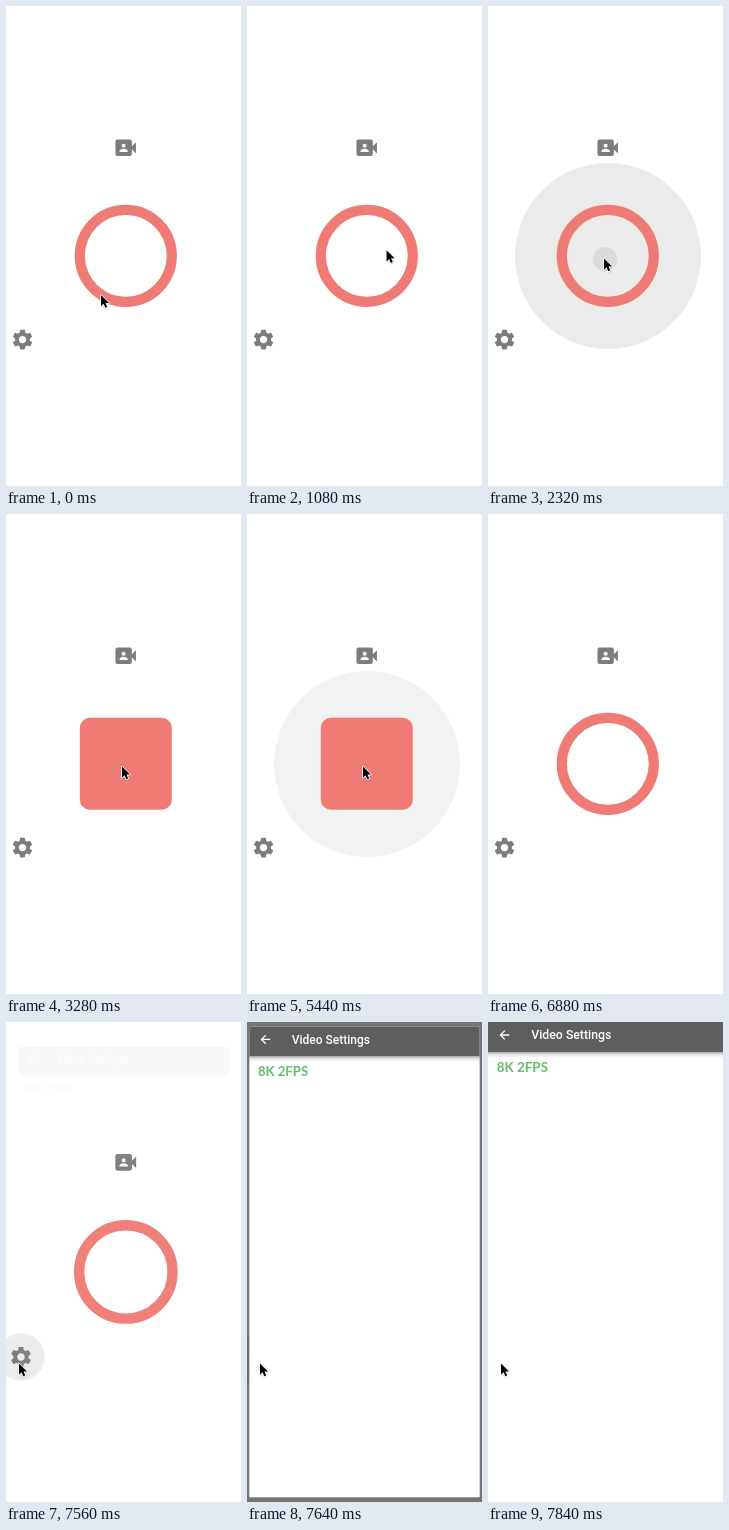
Write an HTML page that moves like this. It is 235x480 px and loops after 8000 ms.

```html
<!DOCTYPE html>
<html lang="en">
<head>
<meta charset="utf-8">
<title>Recorder</title>
<style>
  html, body { margin: 0; width: 100%; height: 100%; overflow: hidden; background: #fff; }
  svg { display: block; width: 100%; height: 100%; }
  .ink { fill: #bcbcbc; }
  .splash { fill: #c0c0c0; }
  .icon { fill: #7c7c7c; }
  .title { font: 500 12.25px Roboto, sans-serif; fill: #fff; }
  .mode { font: 700 13.4px Lato, sans-serif; fill: #66bb6a; }
</style>
</head>
<body>
<svg viewBox="0 0 235 480">
  <defs>
    <linearGradient id="fall" x2="0" y2="1">
      <stop offset="0" stop-opacity=".34"/>
      <stop offset=".45" stop-opacity=".1"/>
      <stop offset="1" stop-opacity="0"/>
    </linearGradient>
    <filter id="soft" x="-50%" y="-50%" width="200%" height="200%">
      <feGaussianBlur stdDeviation="1"/>
    </filter>
    <path id="arrow" d="M0 0V11.2L2.6 8.8 4.3 12.7 6.2 11.9 4.5 8.1H8Z"/>
  </defs>

  <g id="home">
    <rect x="-10" y="-10" width="255" height="500" fill="#fff"/>
    <circle id="recInk" class="ink" cx="120" cy="250" r="93"/>
    <circle id="recSplash" class="splash"/>
    <circle id="gearInk" class="ink" cx="16.5" cy="333.5" r="23.6"/>
    <circle id="gearSplash" class="splash" cx="16" cy="334"/>
    <path class="icon" fill-rule="evenodd" transform="translate(107.4 129.5) scale(1.025)"
      d="M18 10.48V6a2 2 0 0 0-2-2H4a2 2 0 0 0-2 2v12a2 2 0 0 0 2 2h12a2 2 0 0 0 2-2v-4.48l4 3.98v-11ZM10 8a2 2 0 0 1 0 4 2 2 0 0 1 0-4ZM14 16H6v-.57c0-.81.48-1.53 1.22-1.85a7 7 0 0 1 5.56 0c.74.32 1.22 1.04 1.22 1.85Z"/>
    <g id="gear" class="icon" transform="translate(16.5 333.6) scale(1.03)">
      <circle r="5.4" fill="none" stroke="#7c7c7c" stroke-width="3.6"/>
    </g>
    <circle id="ring" cx="119.8" cy="249.8" r="46" fill="none" stroke="#f07b75" stroke-width="10.2"/>
    <rect id="stop" x="73.8" y="203.8" width="92" height="92" rx="10" fill="#f07b75"/>
  </g>

  <rect id="scrim" width="235" height="480"/>

  <g id="settings">
    <rect width="235" height="480" fill="#fff"/>
    <rect y="30" width="235" height="6" fill="url(#fall)"/>
    <rect width="235" height="30" fill="#5e5e5e"/>
    <path d="M21.3 13H12.6M16.8 8.6 12.4 13l4.4 4.4" fill="none" stroke="#fff" stroke-width="1.3"/>
    <text class="title" x="43.3" y="17.4">Video Settings</text>
    <text class="mode" x="8.8" y="50">8K 2FPS</text>
  </g>

  <g id="cursor">
    <use href="#arrow" x=".4" y="1" opacity=".4" filter="url(#soft)"/>
    <use href="#arrow" stroke="#fff" stroke-width="1.6" stroke-linejoin="round"/>
    <use href="#arrow"/>
  </g>
</svg>
<script>
const LOOP = 8000;
const $ = id => document.getElementById(id);
const set = (id, attrs) => {
  for (const k in attrs) $(id).setAttribute(k, attrs[k]);
};
const show = (id, on) => { $(id).style.display = on ? '' : 'none'; };
const lerp = (a, b, p) => a + (b - a) * p;
const span = (t, a, b) => Math.min(1, Math.max(0, (t - a) / (b - a)));
const smooth = p => p * p * (3 - 2 * p);

const bez = (a, b, c, d, u) => {
  const v = 1 - u;
  return v * v * v * a + 3 * v * v * u * b + 3 * v * u * u * c + u * u * u * d;
};

function ease(x1, y1, x2, y2, x) {
  let lo = 0, hi = 1;
  for (let i = 0; i < 24; i++) {
    const mid = (lo + hi) / 2;
    if (bez(0, x1, x2, 1, mid) < x) lo = mid; else hi = mid;
  }
  return bez(0, y1, y2, 1, (lo + hi) / 2);
}

// Linear interpolation through [time, value] pairs
function track(t, keys) {
  let v = keys[0][1];
  for (let i = 1; i < keys.length; i++) {
    if (t >= keys[i - 1][0]) v = lerp(keys[i - 1][1], keys[i][1], span(t, keys[i - 1][0], keys[i][0]));
  }
  return v;
}

// Page zoom: short acceleration, long settle
const zoomCurve = p => p < 1 / 6
  ? 0.4 * ease(0.05, 0, 0.1333, 0.06, p * 6)
  : lerp(0.4, 1, ease(0.2083, 0.82, 0.25, 1, (p - 1 / 6) * 1.2));

const zoom = s => `translate(117.5 240) scale(${s}) translate(-117.5 -240)`;

// Each move: start, end, then the four points of a curve
const straight = (t0, t1, x0, y0, x1, y1) => [t0, t1, [x0, x0, x1, x1], [y0, y0, y1, y1]];
const moves = [
  straight(500, 720, 95, 289, 118, 224),
  [900, 1360, [118, 150, 150, 116.5], [224, 235, 285, 253]],
  straight(1940, 2040, 116.5, 253, 116, 252.5),
  [6140, 6980, [116, 85, 15, -12], [252.5, 275, 335, 342]],
  straight(7000, 7360, -10, 342, 13, 341.5)
];

function cursorAt(t) {
  const m = moves.filter(k => t >= k[0]).pop() || moves[0];
  const u = m[0] === 900 || m[0] === 6140 ? smooth(span(t, m[0], m[1])) : span(t, m[0], m[1]);
  return [bez(...m[2], u), bez(...m[3], u)];
}

function drawRecord(t) {
  const recording = t >= 2400 && t < 5560;
  show('ring', !recording);
  show('stop', recording);

  const second = t > 4000;
  const ink = second
    ? (t < 5440 ? 0 : track(t, [[5560, 0.48], [5740, 0]]))
    : track(t, [[2200, 0], [2320, 0.75], [2400, 0.75], [2580, 0]]);
  const r = second
    ? track(t, [[5440, 8], [5560, 22], [5720, 54]])
    : track(t, [[2220, 2], [2320, 12], [2400, 16], [2520, 54]]);
  const fade = second
    ? (t < 5440 ? 0 : track(t, [[5600, 1], [5740, 0]]))
    : t < 2220 ? 0 : track(t, [[2420, 1], [2560, 0]]);
  const drift = span(r, 12, 54);
  set('recInk', { opacity: ink * 0.4 });
  set('recSplash', {
    cx: lerp(117, 119, drift), cy: lerp(253, 251, drift), r, opacity: fade * 0.4
  });
}

function drawPages(t) {
  const p = span(t, 7522, 7822);
  const z = zoomCurve(p);
  show('home', p < 1);
  set('home', { transform: zoom(lerp(1, 1.05, z)) });
  set('gearInk', { opacity: 0.24 * span(t, 7480, 7560) });
  set('gearSplash', { r: track(t, [[7480, 4], [7560, 21.5], [7640, 24]]), opacity: 0.1 * span(t, 7480, 7530) });
  set('scrim', { opacity: 0.6 * span(p, 0.2075, 0.4175) });
  set('settings', { opacity: span(p, 0.125, 0.25), transform: zoom(lerp(0.85, 1, z)) });
}

function draw(t) {
  drawRecord(t);
  drawPages(t);
  const [x, y] = cursorAt(t);
  set('cursor', { transform: `translate(${x} ${y})` });
}

for (let i = 0; i < 6; i++) {
  $('gear').insertAdjacentHTML('beforeend',
    `<path transform="rotate(${i * 60})" d="M-2.3-9.2Q-2.2-9.6-1.8-9.6H1.8Q2.2-9.6 2.3-9.2L2.8-6H-2.8Z"/>`);
}

const start = performance.now();
function tick() {
  draw((performance.now() - start) % LOOP);
  requestAnimationFrame(tick);
}
tick();
</script>
</body>
</html>
```
